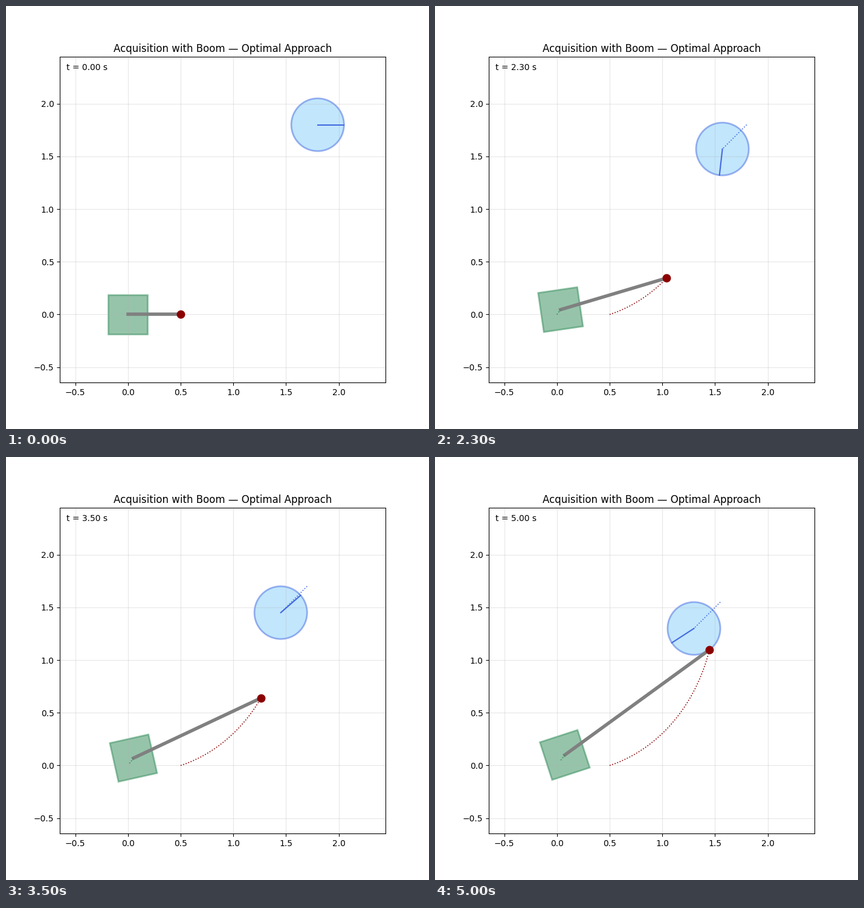
A matplotlib script for the animation above (5.1 s loop, 700x700 px).

```python
import numpy as np
import matplotlib.pyplot as plt
from matplotlib.animation import FuncAnimation
from matplotlib.patches import Circle, Polygon

FRAMES, DT, TRAIL = 51, 0.1, 25
RADIUS, SIDE, BOOM_START, SPIN = 0.25, 0.375, 0.5, 2.0
PAD = 0.645

t = np.arange(FRAMES) * DT
T_END = t[-1]


def polar(r, angle):
    return np.stack([r * np.cos(angle), r * np.sin(angle)], axis=-1)


# Straight drift of both bodies
base = np.outer(t, [0.015, 0.02])
ball = 1.8 - np.outer(t, [0.1, 0.1])

# The boom ends tangent to the ball's rim
gap = ball[-1] - base[-1]
dist = np.hypot(*gap)
end_angle = np.arctan2(gap[1], gap[0]) - np.arcsin(RADIUS / dist)
end_length = np.sqrt(dist**2 - RADIUS**2)

boom_angle = end_angle * t / T_END
boom_length = BOOM_START + (end_length - BOOM_START) * t / T_END
tip = base + polar(boom_length, boom_angle)
rim = ball + polar(RADIUS, SPIN * t)


def square(k):
    corners = np.pi / 4 + np.pi / 2 * np.arange(4)
    return base[k] + polar(SIDE / np.sqrt(2), corners + boom_angle[k] / 2)


fig, ax = plt.subplots(figsize=(7, 7), dpi=100)
ax.set_aspect("equal")
ax.set_xlim(-PAD, 1.8 + PAD)
ax.set_ylim(-PAD, 1.8 + PAD)
ax.grid(True, alpha=0.3)
ax.set_title("Acquisition with Boom — Optimal Approach")

disc = ax.add_patch(Circle(ball[0], RADIUS, fc="lightskyblue",
                           ec="royalblue", lw=2, alpha=0.5))
body = ax.add_patch(Polygon(square(0), closed=True, fc="seagreen",
                            ec="seagreen", lw=2, alpha=0.5))
spoke, = ax.plot([], [], color="royalblue", lw=1.5)
boom, = ax.plot([], [], color="gray", lw=4)


def dotted(color):
    return ax.plot([], [], ":", color=color, lw=1.2)[0]


base_trail = dotted("seagreen")
ball_trail = dotted("royalblue")
tip_trail = dotted("darkred")
knob, = ax.plot([], [], "o", color="darkred", ms=9)
clock = ax.text(0.02, 0.98, "", transform=ax.transAxes, va="top")


def draw(k):
    disc.center = ball[k]
    body.set_xy(square(k))
    spoke.set_data(*np.array([ball[k], rim[k]]).T)
    boom.set_data(*np.array([base[k], tip[k]]).T)
    first = max(0, k - TRAIL)
    base_trail.set_data(*base[first:k + 1].T)
    ball_trail.set_data(*ball[first:k + 1].T)
    tip_trail.set_data(*tip[:k + 1].T)
    knob.set_data(*tip[k:k + 1].T)
    clock.set_text(f"t = {t[k]:.2f} s")
    return disc, body, spoke, boom, base_trail, ball_trail, tip_trail, knob, clock


anim = FuncAnimation(fig, draw, frames=FRAMES, interval=100,
                     repeat=True, repeat_delay=0, blit=False)
plt.show()
```
